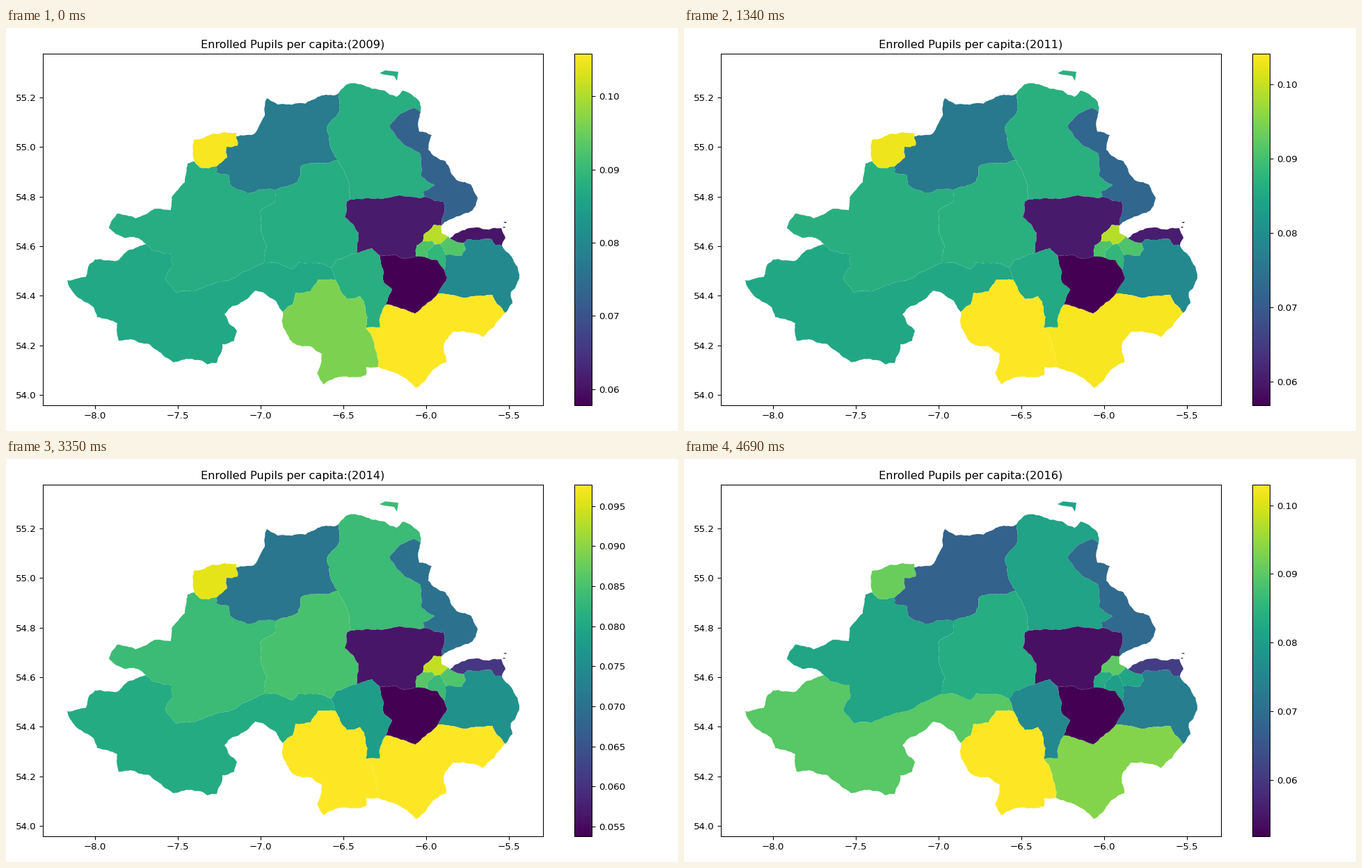
These frames come from a looping animation (966 by 580 pixels, 7.37 s). A matplotlib script:

```python
import math
import random

import numpy as np
import matplotlib.pyplot as plt
from matplotlib.animation import FuncAnimation
from matplotlib.collections import PolyCollection

W, H, DPI = 966, 580, 96.6
LEFT, RIGHT, TOP, BOTTOM = 53, 772, 37, 543
PLOT_SHARE = 0.8  # the rest of the width belongs to the colorbar
FIRST_YEAR, LAST_YEAR, HOLD_FRAMES = 2009, 2016, 3

rng = random.Random(4)
borders = []


def lon(x):
    return -8 + (x - 128.3) / 238


def lat(y):
    return 54 - (y - 528) / 356.7


def fractal(a, b):
    """Points from a up to b, with the midpoint pushed aside repeatedly."""
    dx, dy = b[0] - a[0], b[1] - a[1]
    if math.hypot(dx, dy) < 4:
        return [a]
    push = rng.uniform(-0.09, 0.09)
    middle = ((a[0] + b[0]) / 2 - dy * push, (a[1] + b[1]) / 2 + dx * push)
    return fractal(a, middle) + fractal(middle, b)


def border(owners, *xy):
    """Store a line shared by two regions, or a coast owned by one."""
    points = list(zip(xy[::2], xy[1::2]))
    path = [p for a, b in zip(points, points[1:]) for p in fractal(a, b)]
    borders.append((owners.split(), path + [points[-1]]))


def outline(region):
    """Join all borders of a region into one ring."""
    arcs = [path for owners, path in borders if region in owners]
    ring = list(arcs.pop(0))
    while arcs:
        arc = next(a for a in arcs if ring[-1] in (a[0], a[-1]))
        arcs.remove(arc)
        ring += (arc if arc[0] == ring[-1] else arc[::-1])[1:]
    return ring


# Coasts and outer frontier
border("city", 271, 192, 270, 161, 299, 152, 331, 151, 331, 156)
border("northwest", 331, 156, 356, 153, 372, 126, 375, 101, 390, 110,
       430, 109, 448, 99, 472, 97, 478, 94)
border("north", 478, 94, 490, 81, 525, 87, 561, 99, 570, 90, 595, 107, 596, 121)
border("northeast", 596, 121, 594, 149, 612, 154, 607, 175, 632, 192, 650, 220,
       669, 226, 678, 245, 670, 263, 626, 284)
border("port", 626, 284, 626, 295, 636, 300)
border("harbour", 636, 300, 638, 303)
border("shore", 638, 303, 654, 292, 676, 287, 712, 288, 718, 302, 713, 313)
border("lough", 713, 313, 735, 343, 738, 360, 726, 380, 728, 396, 718, 410)
border("southeast", 718, 410, 702, 430, 686, 445, 673, 439, 643, 437, 631, 451,
       633, 481, 607, 500, 589, 518, 545, 491, 535, 488)
border("south", 535, 488, 518, 488, 517, 500, 456, 513, 447, 497, 454, 469,
       440, 459, 412, 453, 399, 432, 398, 409)
border("southwest", 398, 409, 388, 393, 358, 378, 343, 392, 314, 412, 332, 436,
       328, 450, 311, 455, 303, 482, 289, 484, 266, 476, 240, 481, 206, 455,
       162, 450, 160, 425, 131, 416, 126, 402, 92, 374, 88, 363, 115, 358,
       120, 340, 128, 333, 160, 335, 178, 319, 201, 311)
border("west", 201, 311, 188, 302, 170, 302, 148, 288, 160, 267, 186, 274,
       214, 260, 237, 262, 238, 244, 257, 222, 261, 195, 271, 192)

# Inner borders
border("city northwest", 331, 156, 333, 169, 317, 171, 318, 186, 303, 199)
border("city west", 303, 199, 279, 201, 271, 192)
border("northwest north", 478, 94, 480, 117, 461, 143, 477, 190)
border("northwest middle", 477, 190, 452, 194, 424, 199, 419, 222, 388, 233)
border("northwest west", 388, 233, 346, 237, 322, 225, 320, 211, 303, 208,
       303, 199)
border("west middle", 388, 233, 387, 249, 365, 264, 375, 314, 371, 338)
border("north middle", 477, 190, 487, 208, 495, 247)
border("middle airport", 495, 247, 490, 250, 487, 272, 507, 295, 504, 324)
border("middle orchard", 504, 324, 475, 334, 467, 345)
border("southwest middle", 371, 338, 412, 347, 421, 337, 467, 345)
border("southwest orchard", 467, 345, 473, 362)
border("southwest south", 473, 362, 449, 362, 438, 379, 416, 381, 412, 398,
       398, 409)
border("southwest west", 201, 311, 209, 319, 238, 326, 239, 344, 229, 360,
       245, 381, 341, 351, 371, 338)
border("north northeast", 596, 121, 587, 115, 566, 124, 551, 142, 577, 171,
       596, 181, 597, 213, 616, 226, 600, 235, 602, 243)
border("northeast airport", 602, 243, 629, 250, 626, 284)
border("north airport", 495, 247, 565, 241, 602, 243)
border("airport port", 626, 284, 615, 283, 600, 298, 599, 307)
border("airport mill", 599, 307, 590, 313, 589, 329)
border("airport valley", 589, 329, 577, 332, 537, 327)
border("airport orchard", 537, 327, 526, 317, 504, 324)
border("port mill", 599, 307, 612, 306, 616, 312)
border("port campus", 616, 312, 624, 311)
border("port harbour", 624, 311, 636, 300)
border("mill campus", 616, 312, 606, 321, 606, 331)
border("mill valley", 589, 329, 606, 331)
border("campus valley", 606, 331, 620, 334, 630, 348)
border("campus harbour", 624, 311, 632, 327)
border("campus lough", 632, 327, 630, 348)
border("harbour lough", 658, 309, 661, 318, 655, 328, 632, 327)
border("harbour shore", 638, 303, 658, 309)
border("shore lough", 658, 309, 663, 304, 698, 304, 703, 312, 713, 313)
border("lough southeast", 718, 410, 699, 384, 660, 388, 621, 382)
border("lough valley", 630, 348, 634, 359, 621, 382)
border("valley southeast", 621, 382, 601, 400, 588, 411, 568, 404, 546, 398)
border("valley orchard", 537, 327, 542, 347, 543, 366, 555, 376, 546, 398)
border("orchard southeast", 546, 398, 540, 410, 537, 431, 517, 431)
border("orchard south", 517, 431, 517, 402, 509, 386, 490, 390, 473, 362)
border("south southeast", 517, 431, 528, 450, 535, 488)


def trend(start, end, **turns):
    """Pupils per 1000: level until 2010, then straight to 2016 via any turns."""
    keys = {2010: start, 2016: end}
    keys.update((int(year[1:]), value) for year, value in turns.items())
    return sorted(keys.items())


trends = {
    "southwest": trend(86.5, 89.7, y2015=79.2),
    "west": trend(87.7, 81.8),
    "city": trend(105.4, 91.2),
    "northwest": trend(77.6, 67.7),
    "north": trend(87.9, 81.6),
    "middle": trend(87.5, 83.5),
    "northeast": trend(72.8, 69.2),
    "airport": trend(61.2, 53.8),
    "port": trend(100.6, 90.2),
    "mill": trend(92.2, 83.0),
    "campus": trend(89.4, 80.5),
    "harbour": trend(92.8, 81.9),
    "shore": trend(60.6, 60.8),
    "lough": trend(80.3, 73.5),
    "southeast": trend(105.8, 93.6),
    "valley": trend(57.8, 51.8),
    "orchard": trend(87.8, 75.9, y2014=78.0, y2015=65.9),
    "south": trend(109.5, 103.0, y2009=96.3, y2012=98.8, y2014=97.5, y2015=103.7),
}

islands = [
    ("north", [(537, 65), (545, 61), (564, 63), (562, 76), (558, 69), (543, 67)]),
    ("shore", [(715, 279), (720, 279), (718, 281)]),
    ("shore", [(714, 286), (718, 286), (716, 288)]),
]
shapes = [(name, outline(name)) for name in trends] + islands
polygons = [[(lon(x), lat(y)) for x, y in ring] for _, ring in shapes]


def rates(year):
    return np.array([np.interp(year, *zip(*trends[name])) / 1000
                     for name, _ in shapes])


fig, ax = plt.subplots(figsize=(W / DPI, H / DPI), dpi=DPI)
fig.subplots_adjust(left=LEFT / W, right=(LEFT + (RIGHT - LEFT) / PLOT_SHARE) / W,
                    bottom=1 - BOTTOM / H, top=1 - TOP / H)
ax.set_xlim(lon(LEFT), lon(RIGHT))
ax.set_ylim(lat(BOTTOM), lat(TOP))
regions = PolyCollection(polygons, array=rates(FIRST_YEAR), cmap="viridis",
                         edgecolors="none", linewidths=0)
ax.add_collection(regions, autolim=False)
fig.colorbar(regions, ax=ax)


def draw(frame):
    year = min(FIRST_YEAR + frame, LAST_YEAR)
    values = rates(year)
    regions.set_array(values)
    regions.set_clim(values.min(), values.max())
    ax.set_title(f"Enrolled Pupils per capita:({year})")
    return [regions]


anim = FuncAnimation(fig, draw, frames=LAST_YEAR - FIRST_YEAR + 1 + HOLD_FRAMES,
                     interval=670, repeat=True, repeat_delay=0)
plt.show()
```
